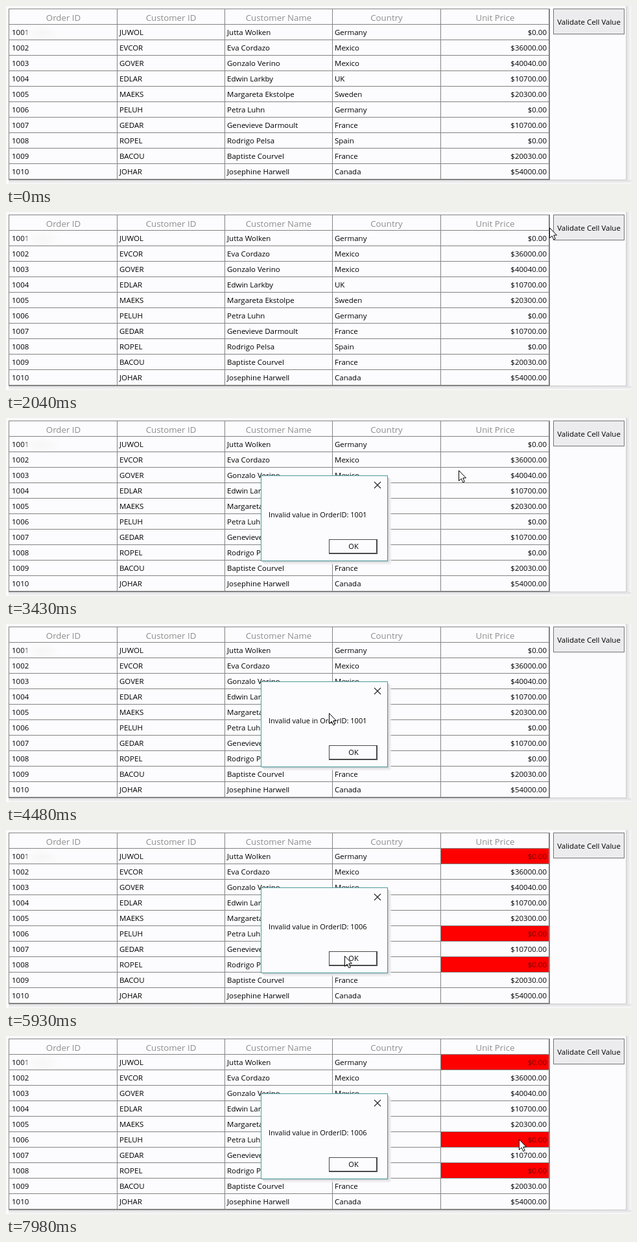
These frames come from a looping animation (964 px wide and 276 px high, 8000 ms). An HTML page:

```html
<!DOCTYPE html>
<html lang="en">
<head>
<meta charset="utf-8">
<title>Validate cell value</title>
<style>
html, body { margin: 0; width: 100%; height: 100%; overflow: hidden; background: #fcfcfe; }
svg { display: block; width: 964px; height: 276px; }
text { font-family: "Open Sans", "Noto Sans", sans-serif; font-size: 11.5px; fill: #000; white-space: pre; }
.head { font-size: 13.3px; fill: #8e8e8e; text-anchor: middle; }
.end { text-anchor: end; }
.mid { text-anchor: middle; }
.dialog { font-size: 11px; }
</style>
</head>
<body>
<svg id="stage" viewBox="0 0 964 276">
  <defs>
    <linearGradient id="fadeX"><stop stop-color="#dedee0"/><stop offset="1" stop-color="#fafafa"/></linearGradient>
    <linearGradient id="fadeY" x2="0" y2="1"><stop stop-color="#dedee0"/><stop offset="1" stop-color="#fafafa"/></linearGradient>
    <radialGradient id="glow"><stop stop-color="#f6f6f6"/><stop offset=".6" stop-color="#fafafa"/><stop offset="1" stop-color="#fcfcfe" stop-opacity="0"/></radialGradient>
  </defs>
</svg>
<script>
const LOOP = 8000;
const LINE = '#828282';
const stage = document.getElementById('stage');

function add(parent, tag, attrs, text) {
  const el = document.createElementNS('http://www.w3.org/2000/svg', tag);
  for (const key in attrs) el.setAttribute(key, attrs[key]);
  if (text !== undefined) el.textContent = text;
  parent.appendChild(el);
  return el;
}
const rect = (p, x, y, width, height, fill, more) => add(p, 'rect', { x, y, width, height, fill, ...more });
const label = (p, x, y, text, cls = '') => add(p, 'text', { x, y, class: cls }, text);
const frame = (p, x, y, w, h, stroke) => rect(p, x + .5, y + .5, w - 1, h - 1, 'none', { stroke });

// Window and its shadow
rect(stage, 0, 0, 964, 276, '#fcfcfe');
rect(stage, 0, 0, 4, 270, '#fafafa');
rect(stage, 957, 0, 7, 270, 'url(#fadeX)');
rect(stage, 4, 270, 960, 6, 'url(#fadeY)');
rect(stage, 956, 0, 1, 270, '#d2d2d4');
rect(stage, 838, 269, 119, 1, '#d2d2d4');

// Table
const cols = [5, 171, 337, 503, 670, 838];
const heads = ['Order ID', 'Customer ID', 'Customer Name', 'Country', 'Unit Price'];
const rows = [
  ['JUWOL', 'Jutta Wolken', 'Germany', 0],
  ['EVCOR', 'Eva Cordazo', 'Mexico', 36000],
  ['GOVER', 'Gonzalo Verino', 'Mexico', 40040],
  ['EDLAR', 'Edwin Larkby', 'UK', 10700],
  ['MAEKS', 'Margareta Ekstolpe', 'Sweden', 20300],
  ['PELUH', 'Petra Luhn', 'Germany', 0],
  ['GEDAR', 'Genevieve Darmoult', 'France', 10700],
  ['ROPEL', 'Rodrigo Pelsa', 'Spain', 0],
  ['BACOU', 'Baptiste Courvel', 'France', 20030],
  ['JOHAR', 'Josephine Harwell', 'Canada', 54000]
];
const reds = add(stage, 'g', {});
const redText = [];
heads.forEach((h, i) => label(stage, (cols[i] + cols[i + 1]) / 2 + .5, 23, h, 'head'));
rows.forEach(([id, name, country, price], r) => {
  const y = 45 + r * 24;
  [1001 + r, id, name, country].forEach((s, c) => label(stage, cols[c] + 4, y, s));
  const cell = label(stage, 834, y, '$' + price.toFixed(2), 'end');
  if (!price) {
    rect(reds, 671, y - 16, 167, 23, '#f00');
    redText.push(cell);
  }
});
add(stage, 'ellipse', { cx: 56, cy: 42, rx: 30, ry: 14, fill: 'url(#glow)' });
for (let r = 1; r <= 10; r++) rect(stage, 5, 4 + r * 24, 833, 1, LINE);
cols.slice(1, 5).forEach(x => rect(stage, x, 4, 1, 265, LINE));
frame(stage, 4, 4, 835, 266, LINE);
rect(stage, 837, 4, 2, 266, LINE);
rect(stage, 4, 268, 835, 2, LINE);

// Command button
rect(stage, 844, 4, 110, 40, '#ececee');
frame(stage, 844, 4, 110, 40, '#747474');
label(stage, 899, 29, 'Validate Cell Value', 'mid');

// Message box
const dialog = add(stage, 'g', {});
rect(dialog, 397, 94, 197, 133, '#ececee', { rx: 3, opacity: .8 });
rect(dialog, 395, 92, 196, 132, '#d4d4d6', { rx: 2 });
rect(dialog, 393, 89, 196, 133, '#fcfcfe');
frame(dialog, 393, 89, 196, 133, '#4a9a9e');
const message = label(dialog, 405, 154, '', 'dialog');
const cross = add(dialog, 'path', { d: 'M568 99l10 10M578 99l-10 10', stroke: '#222', fill: 'none', 'stroke-width': 1.1 });
frame(dialog, 498, 188, 75, 23, '#484848');
const okEdge = add(dialog, 'path', { d: 'M499 209.5H571.5V189', stroke: '#484848', fill: 'none' });
const okText = label(dialog, 536, 203, 'OK', 'mid dialog');

// Pointer
const pointer = add(stage, 'path', {
  d: 'M.5 .5V16.5L4.2 13L6.8 18.8L9.3 17.7L6.8 12H11.5Z',
  fill: '#fff', stroke: '#000', 'stroke-linejoin': 'round'
});
const path = [
  [70, 932, 254], [500, 900, 190], [1000, 816, 40], [1200, 816, 40], [1600, 808, 154],
  [1780, 808, 154], [2040, 838, 24], [2180, 885, 28], [3050, 885, 28],
  [3800, 520, 132], [4300, 498, 138], [4700, 498, 138], [5100, 521, 195],
  [5500, 521, 195], [5600, 522, 195], [6460, 522, 195], [7100, 818, 156],
  [7250, 815, 143], [7700, 800, 165], [7900, 800, 165], [7980, 791, 160], [8000, 791, 160]
];
const clamp = v => Math.max(0, Math.min(1, v));
const ease = v => v * v * (3 - 2 * v);

function pointerAt(t) {
  const i = path.findIndex(p => p[0] > t);
  const [t0, x0, y0] = path[i - 1], [t1, x1, y1] = path[i];
  const k = ease((t - t0) / (t1 - t0));
  return [x0 + (x1 - x0) * k, y0 + (y1 - y0) * k].map(Math.round);
}
const show = (el, on) => el.setAttribute('visibility', on ? 'inherit' : 'hidden');

function draw(t) {
  show(pointer, t >= 70);
  if (t >= 70) pointer.setAttribute('transform', `translate(${pointerAt(t)})`);

  const second = t >= 5550;
  const k = clamp((t - (second ? 5550 : 2590)) / 160);
  const scale = .97 + .03 * k;
  show(dialog, k > 0 && (t < 5450 || second));
  dialog.setAttribute('opacity', k);
  dialog.setAttribute('transform', `translate(491 155) scale(${scale}) translate(-491 -155)`);
  message.textContent = 'Invalid value in OrderID: ' + (second ? 1006 : 1001);

  const pressed = t >= 5200 && t < 5450;
  show(cross, !pressed);
  show(okEdge, !pressed);
  okText.setAttribute('transform', pressed ? 'translate(1 1)' : '');

  const invalid = t >= 5200;
  show(reds, invalid);
  redText.forEach(el => { el.style.fill = invalid ? '#700000' : '#000'; });
}

const start = performance.now();
function tick() {
  draw((performance.now() - start) % LOOP);
  requestAnimationFrame(tick);
}
draw(0);
requestAnimationFrame(tick);
</script>
</body>
</html>
```
